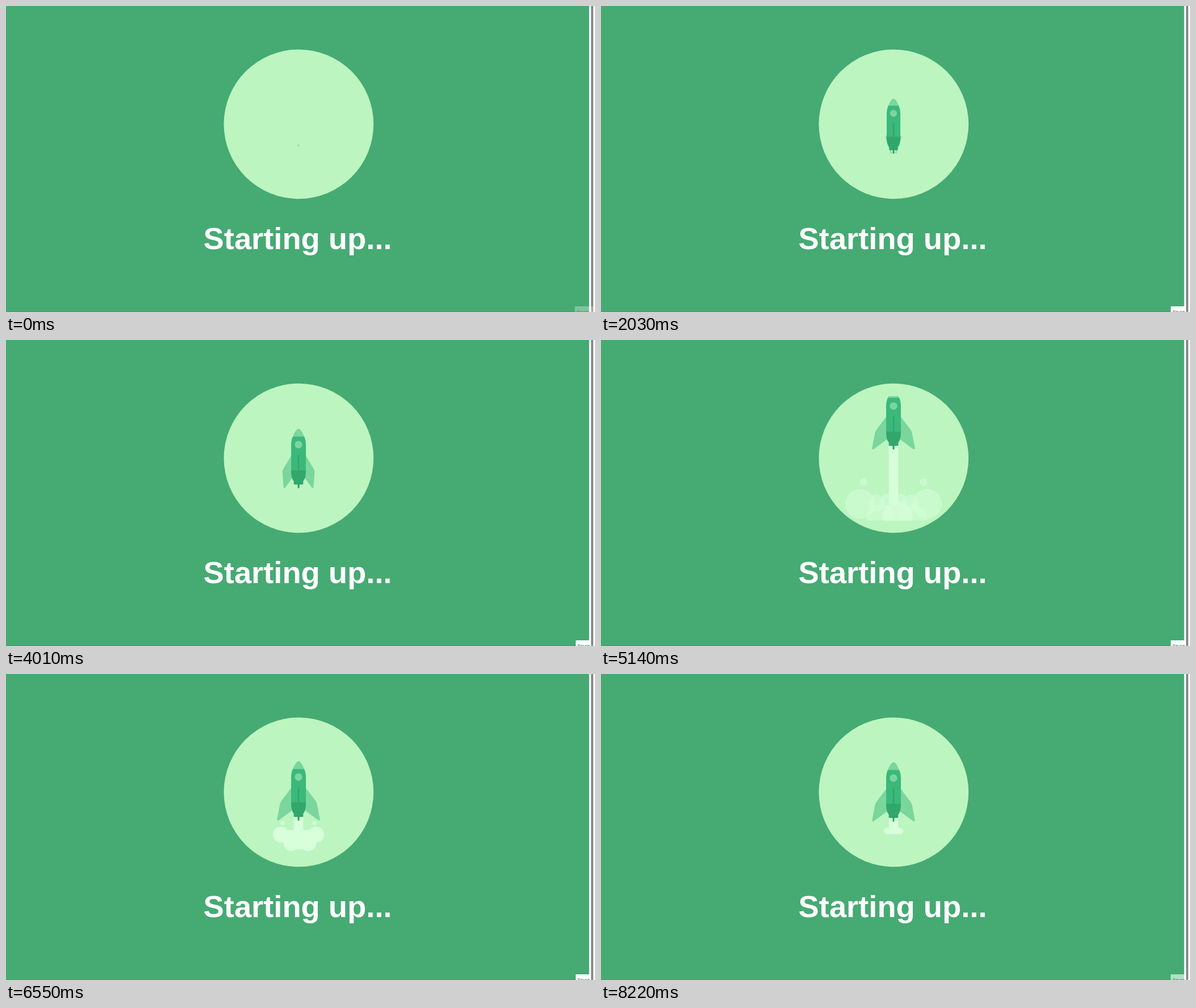
Animation, 1037 px wide and 540 px high, one loop 8.24 s. Source, as an HTML page:

```html
<!DOCTYPE html>
<html lang="en">
<head>
<meta charset="utf-8">
<title>Starting up</title>
<style>
  html, body { margin: 0; width: 100%; height: 100%; overflow: hidden; background: #46aa73; }
  svg { display: block; width: 1037px; height: 540px; }
  text { font-family: "Liberation Sans", Arial, sans-serif; }
</style>
</head>
<body>
<svg viewBox="0 0 1037 540">
  <defs>
    <clipPath id="scene"><rect x="384" y="99" width="264" height="219.5"/></clipPath>
  </defs>
  <rect width="1037" height="540" fill="#46aa73"/>
  <rect y="539" width="1027" height="1" fill="#409b69"/>
  <circle cx="515.3" cy="208.5" r="131.8" fill="#bcf5bf"/>
  <g clip-path="url(#scene)">
    <g id="smoke" fill="#d6ffda"></g>
    <rect id="jet" x="506.8" width="16.4" fill="#d6ffda"/>
    <g id="rocket">
      <path id="finL" fill="#7ad69d"/>
      <path id="finR" fill="#7ad69d" transform="translate(1030 0) scale(-1 1)"/>
      <path fill="#7ad69d" d="M505 151.7C508 144 511.5 138 515 138S522 144 525 151.7Z"/>
      <path fill="#3cb87b" d="M505 151.5H525Q528 158 528 166V211H502V166Q502 158 505 151.5Z"/>
      <path fill="#31a76c" d="M502 210.7H528Q528 223 525 228Q524.5 229.5 523.3 229.8V235Q523.3 236.3 522 236.3H508Q506.7 236.3 506.7 235V229.8Q505.5 229.5 505 228Q502 223 502 210.7Z"/>
      <rect x="513.8" y="184" width="2.4" height="28" rx="1.2" fill="#31a76c"/>
      <rect x="513.5" y="234" width="3" height="9" rx="1.4" fill="#28a063"/>
      <circle cx="515" cy="166" r="6.6" fill="#7ad69d"/>
    </g>
  </g>
  <text x="347.6" y="429.4" font-size="54.3" font-weight="700" fill="#fff">Starting up...</text>
  <rect x="1026.7" width="11" height="540" fill="#fff"/>
  <rect x="1030" y="-5" width="4" height="545" rx="1.5" fill="#8b8b8b"/>
  <g id="button">
    <rect id="plate" y="530" height="10" fill="#fff"/>
    <text id="label" y="541.5" font-size="7.6" fill="#3c7d58">Pause</text>
  </g>
</svg>
<script>
const LOOP = 8240, CENTER = 515, VENT = 277;
const END = 1590, PAUSE = 250;            // phase length and rest between launches
const STALL_AT = 5700, STALL = 150;       // the motion hangs once per loop
const STARTS = [20, 1860, 3690, 5560, 7440, 9290];

const $ = id => document.getElementById(id);
const clamp = v => Math.max(0, Math.min(1, v));
const span = (v, a, b) => clamp((v - a) / (b - a));
const mix = (a, b, k) => a + (b - a) * k;
const easeOut = (k, n) => 1 - (1 - k) ** n;

function set(node, attrs) {
  for (const name in attrs) node.setAttribute(name, attrs[name]);
}

// Final state of each kind of puff; every kind appears on both sides.
const kinds = [
  { spread: 28, lean: 6, y: 316, r: 26 },
  { spread: 59, lean: 0, y: 289, r: 26 },
  { spread: 30, lean: 0, y: 288, r: 15 },
  { spread: 11, lean: 0, y: 284, r: 13 },
  { spread: 0, lean: 7, y: 311, r: 26 },
  { spread: 53, lean: 0, y: 251, r: 6.8 },
  { spread: 19, lean: 0, y: 265, r: 1.5 }
];
const puffs = kinds.flatMap(kind => [-1, 1].map(side => {
  const node = document.createElementNS("http://www.w3.org/2000/svg", "circle");
  $("smoke").append(node);
  return { ...kind, side, node };
}));

function phaseAt(time) {
  const t = time - Math.max(0, Math.min(STALL, time - STALL_AT));
  const next = STARTS.findIndex(start => start > t);
  if (next < 1) return 0;
  const start = STARTS[next - 1];
  return Math.min(END, END * (t - start) / (STARTS[next] - PAUSE - start));
}

function finPath(k) {
  const shoulder = mix(500, 483.5, k ** 0.6), tip = mix(509, 477.3, k);
  return `M503 184L${shoulder + 2} 207Q${shoulder} 210 ${shoulder - k} 213` +
    `L${tip} 240Q${tip} 244 ${tip + 3} 242L504 224.5Z`;
}

function drawRocket(p) {
  const lift = 18.7 * Math.exp(0.0053 * (p - 1180)) * span(p, 300, 500);
  const y = 18.7 - lift;
  const scale = mix(0.035, 1, easeOut(span(p, 0, 300), 3));
  const pivot = 247.4;
  set($("rocket"), {
    visibility: p < END ? "visible" : "hidden",
    transform: `translate(${CENTER} ${pivot}) scale(${scale}) translate(${-CENTER} ${y - pivot})`
  });
  const fin = finPath(easeOut(span(p, 230, 440), 2));
  set($("finL"), { d: fin });
  set($("finR"), { d: fin });

  const top = 236 + y;
  const bottom = mix(254, 290, span(p, 500, 740)) - 191 * span(p, 1410, END) ** 2.2;
  set($("jet"), { y: top, height: p > 500 ? Math.max(0, bottom - top) : 0 });
}

function drawSmoke(p) {
  const grow = easeOut(span(p, 630, 1421), 1.9);
  const birth = span(p, 530, 630);
  const opacity = 1 - span(p, 1395, 1455);
  for (const { spread, lean, y, r, side, node } of puffs) {
    set(node, {
      cx: CENTER + side * spread * mix(0.2 * birth, 1, grow) + lean * grow,
      cy: mix(VENT, y, easeOut(grow, 1.5)),
      r: r * mix(0.23 * birth, 1, grow),
      opacity
    });
  }
}

function drawButton(t) {
  const hover = 1 - span(t, 20, 250);
  let opacity = mix(0.06, 0.32, hover);
  opacity = mix(opacity, 1, span(t, 1300, 1600));
  opacity = mix(opacity, 0.6, span(t, 8080, 8220));
  set($("plate"), { x: 1003 - 1.5 * hover, width: 27 + 5 * hover });
  set($("label"), { x: 1006.5 - 1.5 * hover });
  set($("button"), { opacity });
}

function draw(t) {
  const p = phaseAt(t);
  drawRocket(p);
  drawSmoke(p);
  drawButton(t);
}

const start = performance.now();
function tick() {
  draw((performance.now() - start) % LOOP);
  requestAnimationFrame(tick);
}
tick();
</script>
</body>
</html>
```
